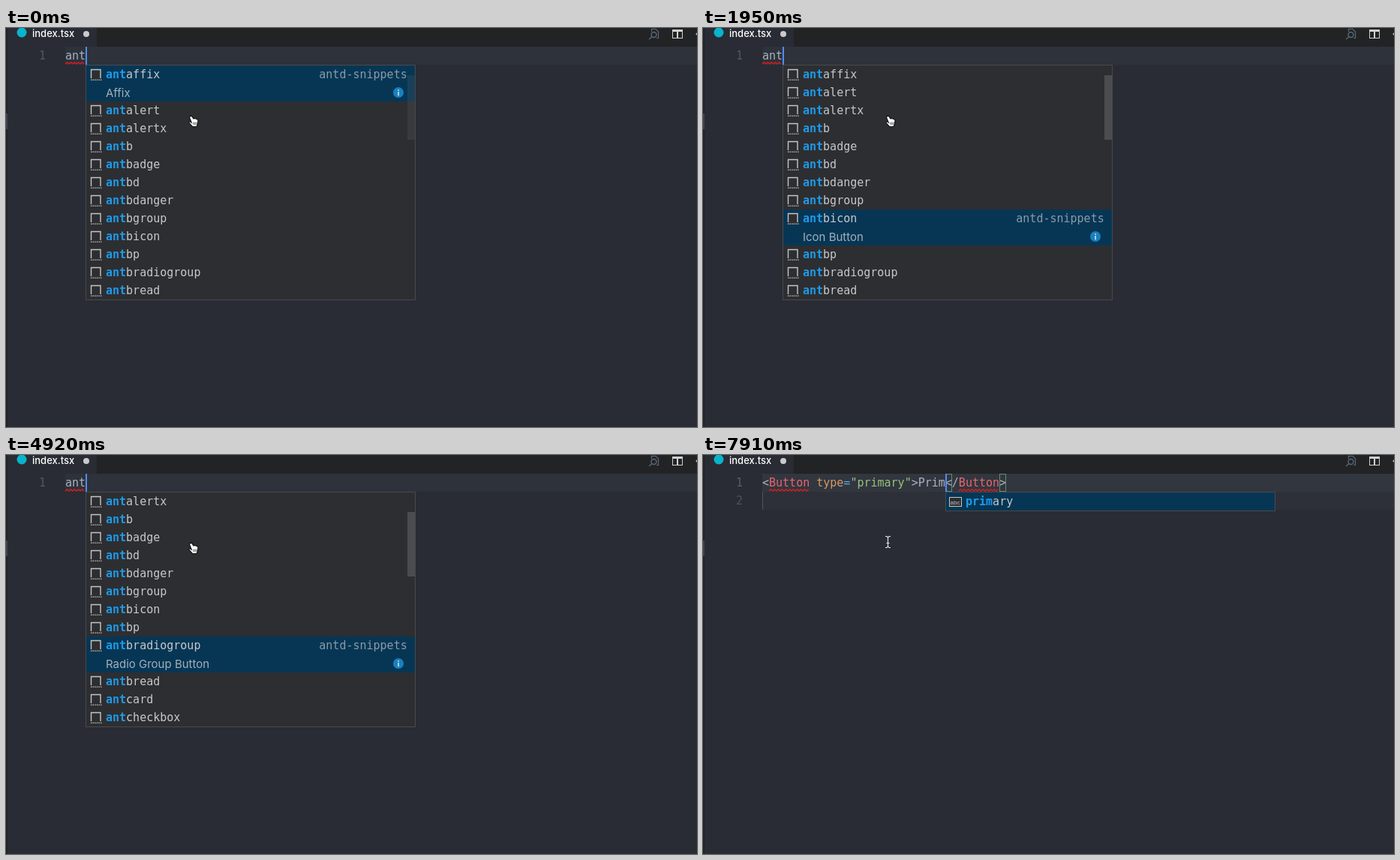
An HTML page with a canvas for the animation above (8 s loop, 921x532 px).

```html
<!DOCTYPE html>
<html lang="en">
<head>
<meta charset="utf-8">
<title>Editor snippets</title>
<style>
html, body { margin: 0; width: 100%; height: 100%; overflow: hidden; background: #292c34; }
canvas { display: block; width: 921px; height: 532px; }
</style>
</head>
<body>
<canvas id="stage" width="921" height="532"></canvas>
<script>
const g = document.getElementById('stage').getContext('2d');
const LOOP = 8000, TICK = 149.2, CHAR = 9.03, LEFT = 79, ROW = 24, VISIBLE = 13;
const MONO = '15px "DejaVu Sans Mono", monospace';
const BOLD = 'bold ' + MONO;
const SANS = '15px Inter, sans-serif';
const C = {
  bg: '#292c34', bar: '#222325', line: '#2d323b', popup: '#2d2e31', border: '#47494b',
  select: '#073655', match: '#1d9bea', text: '#c6c8ca', code: '#abb2bf', icon: '#c5c5c5',
  tag: '#e86671', attr: '#d69a60', equal: '#56a9d8', string: '#98c379', caret: '#528bff',
  bracket: '#638c75', error: '#f01818', dim: '#596a77', pointer: '#e4e5e7'
};

const items = [
  ['affix', 'Affix'], ['alert', 'Alert'], ['alertx', 'Alert Description'],
  ['b', 'Default Button'], ['badge', 'Badge'], ['bd', 'Dashed Button'],
  ['bdanger', 'Danger Button'], ['bgroup', 'Button Group'], ['bicon', 'Icon Button'],
  ['bp', 'Primary Button'], ['bradiogroup', 'Radio Group Button'],
  ['bread', 'Breadcrumb'], ['card', 'Card'], ['checkbox', 'Checkbox']
];

// Time runs in ticks. Each run of arrow keys: first tick, presses (negative = up).
const keyRuns = [[2, 1], [6, 7], [14, 1], [14, 1], [16, 3], [22, -2], [27, 1], [31, -1], [33, -2]];
const INSERT = 37, POINTER = 38, BRACKETS = 39, TABSTOP = 40, ERRORS = 42, TYPE = 46, LAST_KEY = 53;

const clamp = (v, lo, hi) => Math.min(hi, Math.max(lo, v));
const column = n => LEFT + n * CHAR;

function selected(n) {
  return keyRuns.reduce((sum, [first, count]) =>
    sum + Math.sign(count) * clamp(n - first + 1, 0, Math.abs(count)), 0);
}

// The list scrolls only as far as the open row needs.
function firstRow(n) {
  let top = 0;
  for (let k = 0; k <= n; k++) top = Math.max(top, selected(k) + 2 - VISIBLE);
  return top;
}

function typedWord(n) {
  return 'Prim'.slice(0, clamp(n - TYPE + 1, 0, 3) + (n >= LAST_KEY));
}

// The caret toggles three times in ten ticks and restarts lit on each edit.
function caretLit(n) {
  const edits = [0, TABSTOP, TYPE, TYPE + 1, TYPE + 2, LAST_KEY];
  const last = Math.max(...edits.filter(e => e <= n));
  return Math.floor((3 * (n - last) + 1) / 10) % 2 === 0;
}

function rect(x, y, w, h, color) {
  g.fillStyle = color;
  g.fillRect(x, y, w, h);
}

function frame(x, y, w, h, color) {
  g.strokeStyle = color;
  g.lineWidth = 1;
  g.strokeRect(x + .5, y + .5, w - 1, h - 1);
}

function disc(x, y, r, color) {
  g.fillStyle = color;
  g.beginPath();
  g.arc(x, y, r, 0, Math.PI * 2);
  g.fill();
}

function stroke(d, color, width) {
  g.strokeStyle = color;
  g.lineWidth = width;
  g.stroke(new Path2D(d));
}

function text(s, x, y, color, font = MONO) {
  g.font = font;
  g.fillStyle = color;
  g.fillText(s, x, y);
}

function squiggle(x, w) {
  let d = `M${x} 48`;
  for (let i = 1; i * 2.5 <= w; i++) d += `L${x + i * 2.5} ${i % 2 ? 45.8 : 48}`;
  stroke(d, C.error, 1.2);
}

function tabBar() {
  rect(0, 0, 921, 532, C.bg);
  rect(0, 0, 2, 532, C.bar);
  rect(121, 0, 800, 25, C.bar);
  rect(0, 114, 2, 21, '#40444a');
  disc(21, 6, 6.5, '#08b4cc');
  text('index.tsx', 35, 12, '#fff', '500 13px Inter, sans-serif');
  disc(107, 8, 4, '#c9cacb');

  // file search
  stroke('M860.5 5 V1.5 H866 L869.5 5 V13.5 H867', C.dim, 1.2);
  stroke('M867 9 A3.5 3.5 0 1 0 860 9 A3.5 3.5 0 1 0 867 9 M861 11.5 L857 15', C.dim, 1.4);

  // split editor
  frame(888, 2, 14, 12, '#d0d0d0');
  rect(888, 2, 14, 3, '#d0d0d0');
  rect(894, 4, 2, 10, '#d0d0d0');
  disc(921, 8, 1.5, C.icon);
}

function snippetIcon(y) {
  rect(113, y + 5, 14, 15, C.popup);
  stroke(`M113.5 ${y + 17} V${y + 5.5} H126 V${y + 17}`, C.icon, 1.4);
  for (let x = 113; x < 127; x += 2.6) rect(x, y + 18.5, 1.4, 1.4, C.icon);
}

function infoIcon(y) {
  disc(523, y, 7, '#1a80bd');
  rect(522.3, y - 4, 1.5, 1.7, '#d8ebf7');
  rect(522.3, y - 1, 1.5, 5.2, '#d8ebf7');
}

function suggestions(n) {
  const chosen = selected(n), top = firstRow(n);
  rect(106, 49, 440, 314, C.popup);
  let y = 50;
  for (let i = top; y < 362; i++, y += ROW) {
    const [name, detail] = items[i];
    if (i === chosen) {
      rect(107, y, 438, ROW * 2, C.select);
      text('antd-snippets', 417.3, y + 17, '#8c9ba6');
    }
    snippetIcon(y);
    text('ant', 133, y + 17, C.match, BOLD);
    text(name, 133 + 3 * CHAR, y + 17, C.text);
    if (i === chosen) {
      y += ROW;
      text(detail, 133, y + 18, '#a3b0b9', SANS);
      infoIcon(y + 12);
    }
  }
  const fade = clamp(.16 + n * .12, 0, .4);
  rect(535, 63 + top * 6.5, 10, 86, `rgba(121,121,121,${fade})`);
  frame(106, 49, 440, 314, C.border);
}

function wordPopup(word) {
  const n = word.length, x = Math.round(column(23 + n));
  const h = 2 + ROW * (n > 1 ? 1 : 3);
  rect(x, 49, 440, h, C.popup);
  rect(x + 1, 50, 438, ROW, C.select);
  frame(x, 49, 440, h, C.border);
  rect(x + 5, 56, 17, 13, C.popup);
  frame(x + 5, 56, 17, 13, C.icon);
  text('abc', x + 6.5, 65.5, C.icon, '8px "Liberation Sans", sans-serif');
  text('primary'.slice(0, n), x + 27, 67, C.match, BOLD);
  text('primary'.slice(n), x + 27 + n * CHAR, 67, C.text);
}

function hand() {
  const shape = 'M245 118 Q246.5 116.5 248 118 L250 121 Q251 119.7 252 121 ' +
    'Q253.3 120.2 254.2 121.8 Q256 121.5 256 123.5 L255.5 128 L254 131.5 H248.5 ' +
    'L244 126.5 Q243.3 124.5 245.5 125 L247.2 126 L244.6 119.5 Z';
  g.fillStyle = '#fff';
  g.fill(new Path2D(shape));
  stroke(shape, '#111', 1.2);
  stroke('M250 125.5 V129 M252 125.5 V129 M254 125.5 V129', '#222', .8);
}

function beam() {
  stroke('M243 108.5 H245 L246.5 110 L248 108.5 H250 M246.5 110 V122 ' +
    'M243 123.5 H245 L246.5 122 L248 123.5 H250 M244.5 117.5 H248.5', C.pointer, 1.2);
}

function searching(n) {
  rect(LEFT, 25, 842, ROW, C.line);
  text('1', 44, 42, '#525861');
  text('ant', LEFT, 42, C.code);
  squiggle(LEFT, 26);
  suggestions(n);
  return 3;
}

function inserted(n) {
  const word = typedWord(n), end = 23 + word.length;
  rect(LEFT, 25, 842, ROW, '#32363f');
  rect(LEFT, 49, 842, ROW, '#2e3039');
  rect(LEFT, 49, 1, ROW, '#51545b');
  text('1', 44, 42, '#565c67');
  text('2', 44, 66, '#4c525d');
  const tokens = [['<', C.code], ['Button', C.tag], [' type', C.attr], ['=', C.equal],
    ['"primary"', C.string], ['>' + word + '</', C.code], ['Button', C.tag], ['>', C.code]];
  let col = 0;
  for (const [s, color] of tokens) {
    text(s, column(col), 42, color);
    col += s.length;
  }
  if (n >= ERRORS) for (const c of [1, end + 2]) squiggle(column(c), 54);
  if (n >= BRACKETS) for (const c of [end, end + 8]) frame(Math.round(column(c)), 25, 9, ROW, C.bracket);
  if (word) wordPopup(word);
  return end;
}

function draw(t) {
  const n = Math.floor((t + 13) / TICK);
  tabBar();
  const caret = n < INSERT ? searching(n) : inserted(n);
  if (caretLit(n)) rect(Math.round(column(caret)), 25, 2, ROW, C.caret);
  if (n < POINTER) hand(); else beam();
}

const start = performance.now();
function loop() {
  draw((performance.now() - start) % LOOP);
  requestAnimationFrame(loop);
}
loop();
</script>
</body>
</html>
```
